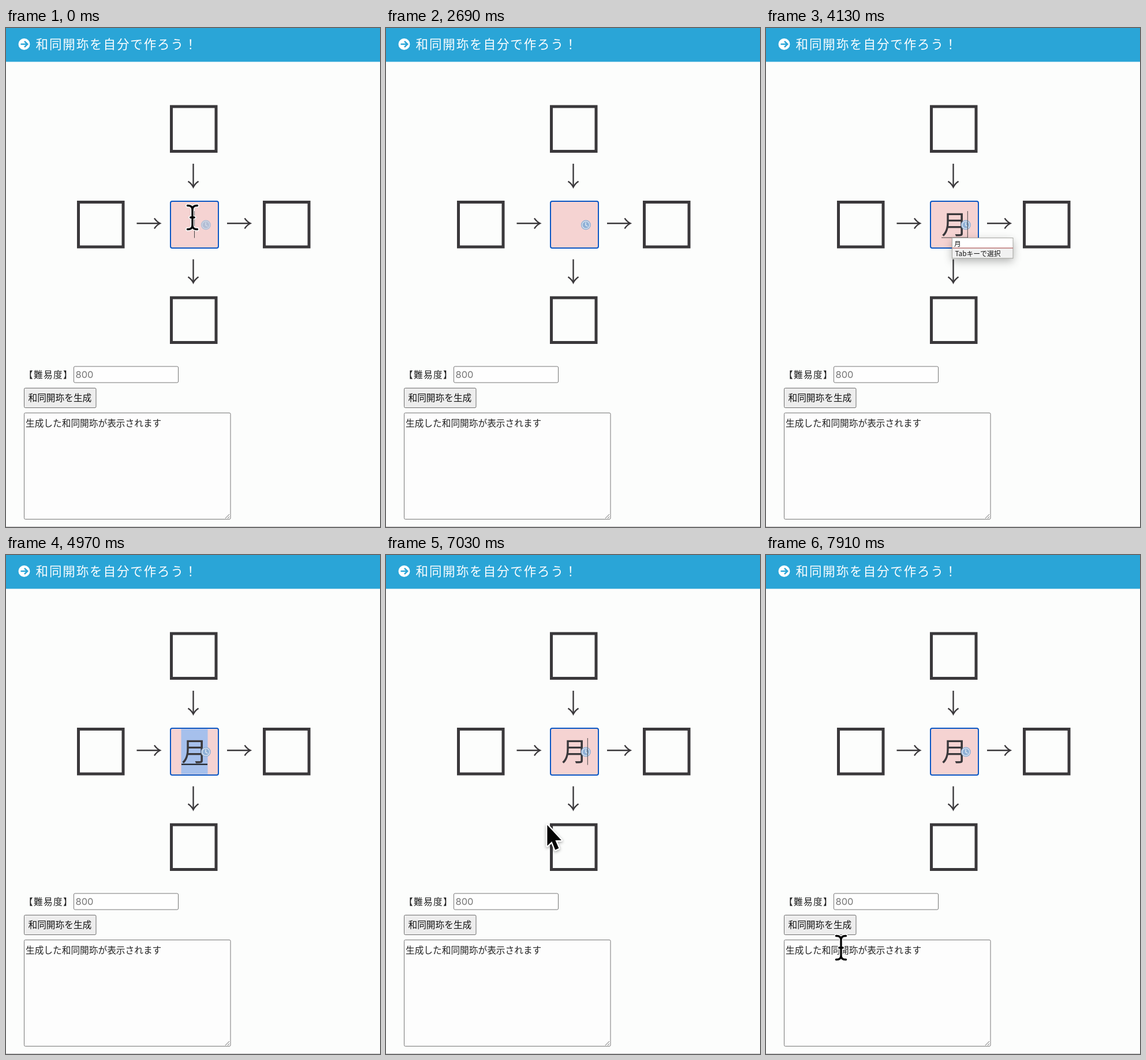
These frames come from a looping animation (648x864 px, 8 s). An HTML page with a canvas:

```html
<!DOCTYPE html>
<html lang="ja">
<head>
<meta charset="utf-8">
<style>
html, body { margin: 0; width: 100%; height: 100%; overflow: hidden; background: #fcfdfc; }
canvas { display: block; }
</style>
</head>
<body>
<canvas id="stage" width="648" height="864"></canvas>
<script>
const ctx = document.getElementById('stage').getContext('2d');
const LOOP = 8000;
const INK = '#3a383b';
const BLUE = '#2aa5d7';
const JP = '"Noto Sans CJK JP", "Noto Sans CJK", sans-serif';

// Times of the hard changes, in ms
const T = { clock: 400, hide: 1200, t: 2850, tsu: 3000, list: 3150, tsuki: 3800,
            select: 4650, commit: 5070, wake: 6680, rest: 7450, end: 7910 };

function text(str, x, y, size, color, spacing = 0, family = JP) {
  ctx.font = `${size}px ${family}`;
  ctx.letterSpacing = spacing + 'px';
  ctx.fillStyle = color;
  ctx.fillText(str, x, y);
}

function rect(x, y, w, h, color) {
  ctx.fillStyle = color;
  ctx.fillRect(x, y, w, h);
}

function panel(x, y, w, h, fill, border, radius = 2, weight = 1) {
  ctx.beginPath();
  ctx.roundRect(x, y, w, h, radius);
  ctx.fillStyle = fill;
  ctx.fill();
  ctx.strokeStyle = border;
  ctx.lineWidth = weight;
  ctx.stroke();
}

function lines(color, weight, ...paths) {
  ctx.beginPath();
  for (const p of paths) {
    ctx.moveTo(p[0], p[1]);
    for (let i = 2; i < p.length; i += 2) ctx.lineTo(p[i], p[i + 1]);
  }
  ctx.strokeStyle = color;
  ctx.lineWidth = weight;
  ctx.stroke();
}

function disc(x, y, r, color) {
  ctx.beginPath();
  ctx.arc(x, y, r, 0, Math.PI * 2);
  ctx.fillStyle = color;
  ctx.fill();
}

function square(x, y) {
  ctx.strokeStyle = INK;
  ctx.lineWidth = 5;
  ctx.strokeRect(x + 2.5, y + 2.5, 77.5, 77.5);
}

// Arrow from (x, y), 41 px long
function arrow(x, y, angle) {
  ctx.save();
  ctx.translate(x, y);
  ctx.rotate(angle);
  lines(INK, 2.4, [0, 0, 40, 0]);
  ctx.beginPath();
  ctx.moveTo(30.5, -9);
  ctx.quadraticCurveTo(34.5, -3, 40.5, 0);
  ctx.quadraticCurveTo(34.5, 3, 30.5, 9);
  ctx.stroke();
  ctx.restore();
}

function header() {
  rect(0, 0, 648, 58.5, BLUE);
  disc(31.5, 28, 10, '#fff');
  lines(BLUE, 2.6, [25.5, 28, 36.5, 28], [32, 22.8, 37.2, 28, 32, 33.2]);
  text('和同開珎を自分で作ろう！', 51.5, 36, 21.5, '#fff', 1.9);
}

function form() {
  text('【難易度】', 31, 606, 15.7, '#222', 1.3);
  panel(117.5, 586, 181, 28, '#fefefe', '#767676');
  text('800', 120.5, 606, 16.5, '#757575', 0, 'Inter, sans-serif');
  panel(31.5, 623.5, 124.5, 34, '#ededed', '#6f6f6f');
  text('和同開珎を生成', 38.5, 646.3, 15.7, '#111');
  panel(31.5, 666.5, 357.5, 184, '#fdfdfd', '#767676');
  text('生成した和同開珎が表示されます', 34, 689.5, 15.7, '#222');
  lines('#666', 1, [380, 849, 387, 842], [384, 849, 387, 846]);
  rect(0, 863, 648, 1, '#c4c4c4');
}

function clock(alpha) {
  ctx.save();
  ctx.globalAlpha = alpha;
  disc(346.3, 341, 8.5, '#8fb0d6');
  ctx.beginPath();
  ctx.arc(346.3, 341, 6.4, 0, Math.PI * 2);
  ctx.strokeStyle = '#dfe6f0';
  ctx.lineWidth = 1.3;
  ctx.stroke();
  lines('#edf1f6', 1.3, [346, 336.5, 346, 341.5, 349.5, 343.5]);
  ctx.restore();
}

function field(t) {
  const composing = t >= T.t && t < T.commit;
  const selected = t >= T.select && t < T.commit;
  const glyph = t < T.t ? '' : t < T.tsu ? 'ｔ' : t < T.tsuki ? 'つ' : '月';
  panel(285, 300, 83, 81, '#f5d3d2', '#0b57c4', 3, 2);
  if (selected) rect(303.5, 301.5, 46, 78, '#a6c0ec');
  if (glyph) text(glyph, 304, 356.5, 45, INK);
  if (selected) rect(304, 361.5, 45, 2, '#111');
  else if (composing) rect(304, 362.5, 45.5, 1, '#444');

  clock(t < T.clock ? 0.65 : 1);

  const blink = t < T.t ? t % 1000 < 500 : (t - 4930) % 1000 < 500;
  const caret = composing ? !selected : blink;
  if (caret) rect(glyph ? 348.8 : 326, 317, 1, 46.5, '#444');
}

function candidates(words) {
  const x = 322.5, y = 363.5, w = 105.5, split = y + words.length * 16.7 + 0.7;
  const h = split + 17.8 - y;
  ctx.save();
  ctx.shadowColor = 'rgba(0,0,0,.3)';
  ctx.shadowBlur = 15;
  ctx.shadowOffsetY = 5;
  rect(x, y, w, h, '#fff');
  ctx.restore();
  rect(x, split, w, 17.8, '#f1f1f1');
  ctx.strokeStyle = '#a5a5a0';
  ctx.lineWidth = 1;
  ctx.strokeRect(x, y, w, h);
  words.forEach((word, i) => text(word, 326, 377.5 + i * 16.6, 11.8, '#111'));
  rect(x, split - 0.5, w, 1.2, '#ad5555');
  text('Tabキーで選択', 327.5, split + 14.2, 11.8, '#111');
}

function beam(x, y) {
  ctx.save();
  ctx.translate(x, y);
  ctx.lineCap = 'round';
  ctx.beginPath();
  for (const s of [-1, 1]) {
    ctx.moveTo(-8.5, 20.5 * s);
    ctx.quadraticCurveTo(0, 21 * s, 0, 13 * s);
    ctx.quadraticCurveTo(0, 21 * s, 8.5, 20.5 * s);
  }
  ctx.moveTo(0, -14);
  ctx.lineTo(0, 14);
  ctx.moveTo(-3.2, 0);
  ctx.lineTo(3.2, 0);
  for (const [color, weight] of [['#fff', 6.5], ['#050505', 3.4]]) {
    ctx.strokeStyle = color;
    ctx.lineWidth = weight;
    ctx.stroke();
  }
  ctx.restore();
}

function pointer(x, y) {
  const p = [[0, 0], [0, 36], [8, 28.5], [13.8, 43], [20, 40.3], [14, 26.5], [24.5, 26.5]];
  ctx.save();
  ctx.translate(x, y);
  ctx.beginPath();
  p.forEach(([a, b]) => ctx.lineTo(a, b));
  ctx.closePath();
  ctx.strokeStyle = '#fff';
  ctx.lineWidth = 4.5;
  ctx.lineJoin = 'round';
  ctx.shadowColor = 'rgba(0,0,0,.35)';
  ctx.shadowBlur = 5;
  ctx.shadowOffsetY = 2;
  ctx.stroke();
  ctx.shadowColor = 'transparent';
  ctx.fillStyle = '#050505';
  ctx.fill();
  ctx.restore();
}

function glide(t, t0, t1, a, b) {
  const k = Math.min(1, Math.max(0, (t - t0) / (t1 - t0)));
  const e = k * k * (3 - 2 * k);
  return [a[0] + (b[0] - a[0]) * e, a[1] + (b[1] - a[1]) * e];
}

function mouse(t) {
  if (t >= T.hide && t < T.wake) return;
  const start = [323, 328], rest = [222.5, 649.5], end = [130, 680];
  const [x, y] = t < T.hide ? start
    : t < T.rest ? glide(t, T.wake, T.rest, start, rest)
    : glide(t, T.rest, T.end, rest, end);
  if (y < 382 || y > 666) beam(x, y);
  else pointer(x, y);
}

function draw(t) {
  rect(0, 0, 648, 864, '#fcfdfc');
  header();
  square(284, 133.5);
  square(123, 299);
  square(445, 299);
  square(284, 464.5);
  arrow(324.5, 235, Math.PI / 2);
  arrow(324.5, 400.5, Math.PI / 2);
  arrow(226.5, 338.3, 0);
  arrow(383, 338.3, 0);
  form();
  field(t);
  if (t >= T.list && t < T.tsuki) candidates(['使うと', '使い倒そう', '使いたい']);
  else if (t >= T.tsuki && t < T.select) candidates(['月']);
  mouse(t);
}

const begin = performance.now();
function tick() {
  draw((performance.now() - begin) % LOOP);
  requestAnimationFrame(tick);
}
tick();
</script>
</body>
</html>
```
